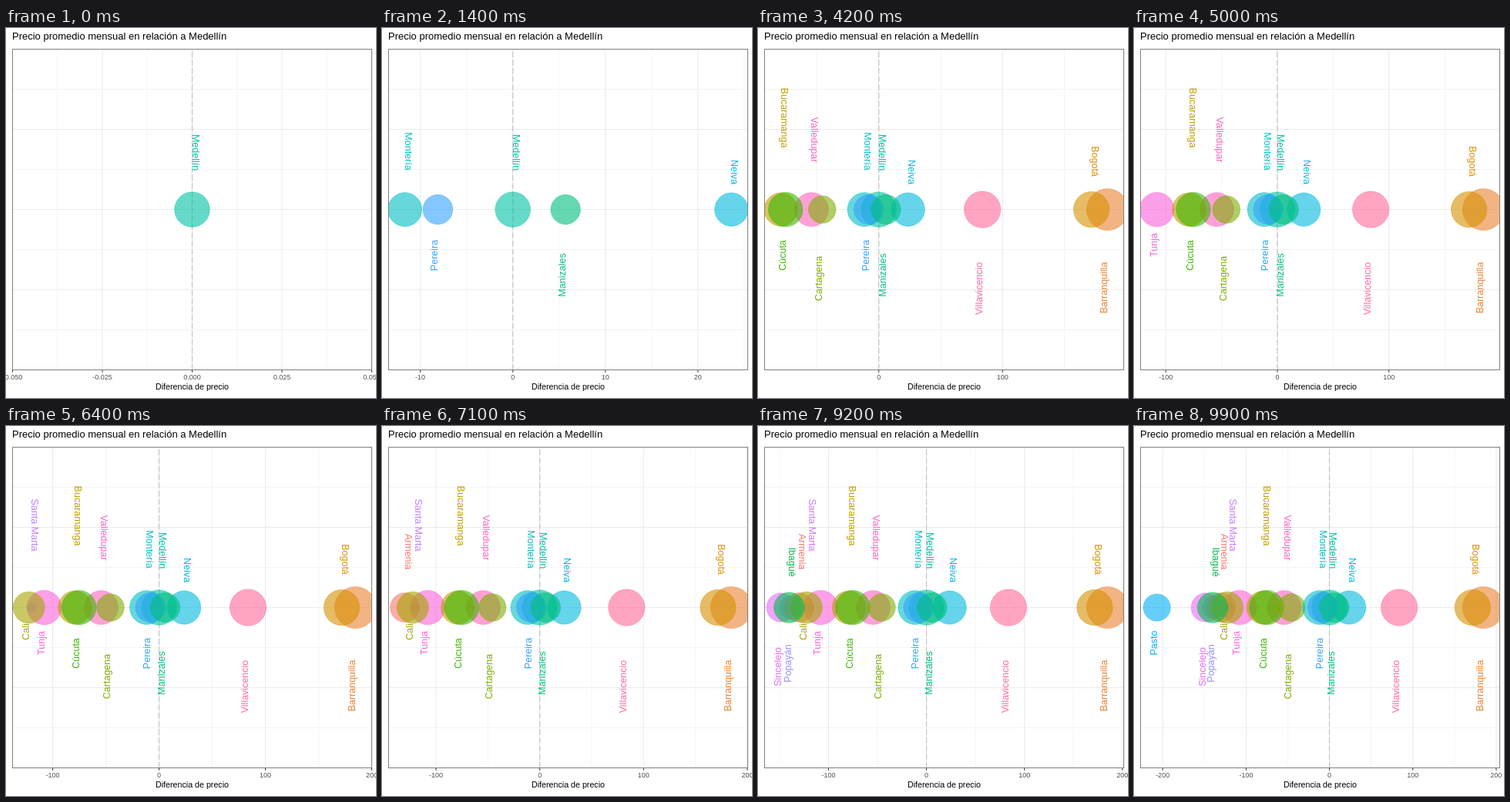
An HTML page for the animation above (10000 ms loop, 480 by 480 pixels).

```html
<!DOCTYPE html>
<html lang="es">
<head>
<meta charset="utf-8">
<style>
  html, body { margin: 0; width: 100%; height: 100%; overflow: hidden; background: #fff; }
  svg { display: block; width: 480px; height: 480px; font-family: "Liberation Sans", Arial, sans-serif; }
</style>
</head>
<body>
<svg id="chart" viewBox="0 0 480 480">
  <defs><clipPath id="panel"><rect x="8" y="27" width="467" height="417"/></clipPath></defs>
  <text x="8" y="15" font-size="13">Precio promedio mensual en relación a Medellín</text>
  <text x="241.5" y="469" font-size="10.7" text-anchor="middle">Diferencia de precio</text>
  <g id="plot" clip-path="url(#panel)"></g>
  <rect x="8.5" y="27.5" width="466" height="416" fill="none" stroke="#7f7f7f"/>
  <g id="axis"></g>
</svg>
<script>
const LEFT = 8.5, RIGHT = 474.5, TOP = 27.5, BOTTOM = 443.5, MID = 235.5;
const LOOP = 10000;
const STARTS = [0, 700, 1400, 2100, 2800, 3500, 4200, 5000, 5700, 6400, 7100, 7800, 8500, 9200, 9900];

// name, price difference, radius, label centre y, colour; back to front
const CITIES = [
  ["Barranquilla", 184.7, 27, 337, "#EA8331"],
  ["Bogotá", 171.8, 23.2, 173, "#D89000"],
  ["Villavicencio", 83.7, 23.7, 338, "#FF6A98"],
  ["Sincelejo", -148.6, 18.7, 312.5, "#E76BF3"],
  ["Tunja", -108, 22.3, 281.5, "#FA62DB"],
  ["Santa Marta", -120, 6, 128.5, "#C77CFF"],
  ["Popayán", -138.4, 15, 308, "#9590FF"],
  ["Armenia", -130, 19, 163, "#F8766D"],
  ["Cali", -122.4, 20.5, 267, "#A3A500"],
  ["Ibagué", -140.1, 19.8, 176.5, "#00BB4E"],
  ["Valledupar", -54.4, 22, 145, "#FF62BC"],
  ["Bucaramanga", -79.1, 21.7, 116.5, "#C09B00"],
  ["Cúcuta", -75.3, 22.3, 295, "#39B600"],
  ["Cartagena", -45.7, 17.8, 325, "#7CAE00"],
  ["Montería", -11.66, 22, 160, "#00BFC4"],
  ["Neiva", 23.62, 21.7, 187, "#00BAE0"],
  ["Medellín", 0, 22.8, 161.5, "#00C1A3"],
  ["Pereira", -8.1, 19.3, 295, "#35A2FF"],
  ["Manizales", 5.7, 19.2, 320.5, "#00BF7D"],
  ["Pasto", -207, 17.6, 281.5, "#00B0F6"]
].map(([name, value, r, labelY, color]) => ({ name, value, r, labelY, color }));

// Each step reveals the next nearest city on either side of zero.
for (const c of CITIES) {
  c.rank = CITIES.filter(o => o.value * c.value > 0 && Math.abs(o.value) <= Math.abs(c.value)).length;
}

const plot = document.getElementById("plot");
const axis = document.getElementById("axis");

function add(parent, tag, attrs, text) {
  const el = document.createElementNS("http://www.w3.org/2000/svg", tag);
  for (const key in attrs) el.setAttribute(key, attrs[key]);
  if (text) el.textContent = text;
  parent.append(el);
}

function line(parent, x1, y1, x2, y2, stroke, width, extra) {
  add(parent, "line", { x1, y1, x2, y2, stroke, "stroke-width": width, ...extra });
}

function range(cities) {
  const values = cities.map(c => c.value);
  const lo = Math.min(...values), hi = Math.max(...values);
  const pad = lo === hi ? 0.05 : (hi - lo) * 0.05;
  return [lo - pad, hi + pad];
}

function draw(step) {
  plot.replaceChildren();
  axis.replaceChildren();
  const shown = CITIES.filter(c => c.rank <= step);
  const [lo, hi] = range(shown);
  const px = v => LEFT + (v - lo) / (hi - lo) * (RIGHT - LEFT);
  const gap = [0.025, 5, 10, 50, 50][step] || 100;
  const half = gap / 2;

  for (let i = -3; i <= 3; i++) {
    const y = MID + i * 52;
    line(plot, LEFT, y, RIGHT, y, "#ebebeb", i % 2 ? 0.55 : 1.07);
  }
  for (let i = Math.ceil(lo / half - 1e-6); i * half <= hi + 1e-6; i++) {
    const x = px(i * half), major = i % 2 === 0;
    line(plot, x, TOP, x, BOTTOM, "#ebebeb", major ? 1.07 : 0.55);
    if (!major) continue;
    line(axis, x, 444, x, 446.7, "#333", 1.07);
    add(axis, "text", { x, y: 456, "font-size": 9, fill: "#4d4d4d", "text-anchor": "middle" },
      (i * half).toFixed(step ? 0 : 3).replace(/^-(0\.?0*)$/, "$1"));
  }
  line(plot, px(0), BOTTOM, px(0), TOP, "#bebebe", 1.07, { "stroke-dasharray": "7.47 3.2" });

  for (const c of shown) {
    add(plot, "circle", {
      cx: px(c.value), cy: MID, r: c.r, fill: c.color, stroke: c.color,
      "fill-opacity": 0.6, "stroke-opacity": 0.6, "stroke-width": 0.7
    });
  }
  for (const c of shown) {
    const turn = c.labelY < MID ? 90 : -90;
    add(plot, "text", {
      transform: `translate(${px(c.value)} ${c.labelY}) rotate(${turn})`,
      "font-size": 12.5, fill: c.color, "text-anchor": "middle"
    }, c.name);
  }
}

let current = -1;
function tick() {
  const t = performance.now() % LOOP;
  const step = STARTS.filter(s => s <= t).length - 1;
  if (step !== current) draw(current = step);
  requestAnimationFrame(tick);
}
tick();
</script>
</body>
</html>
```
